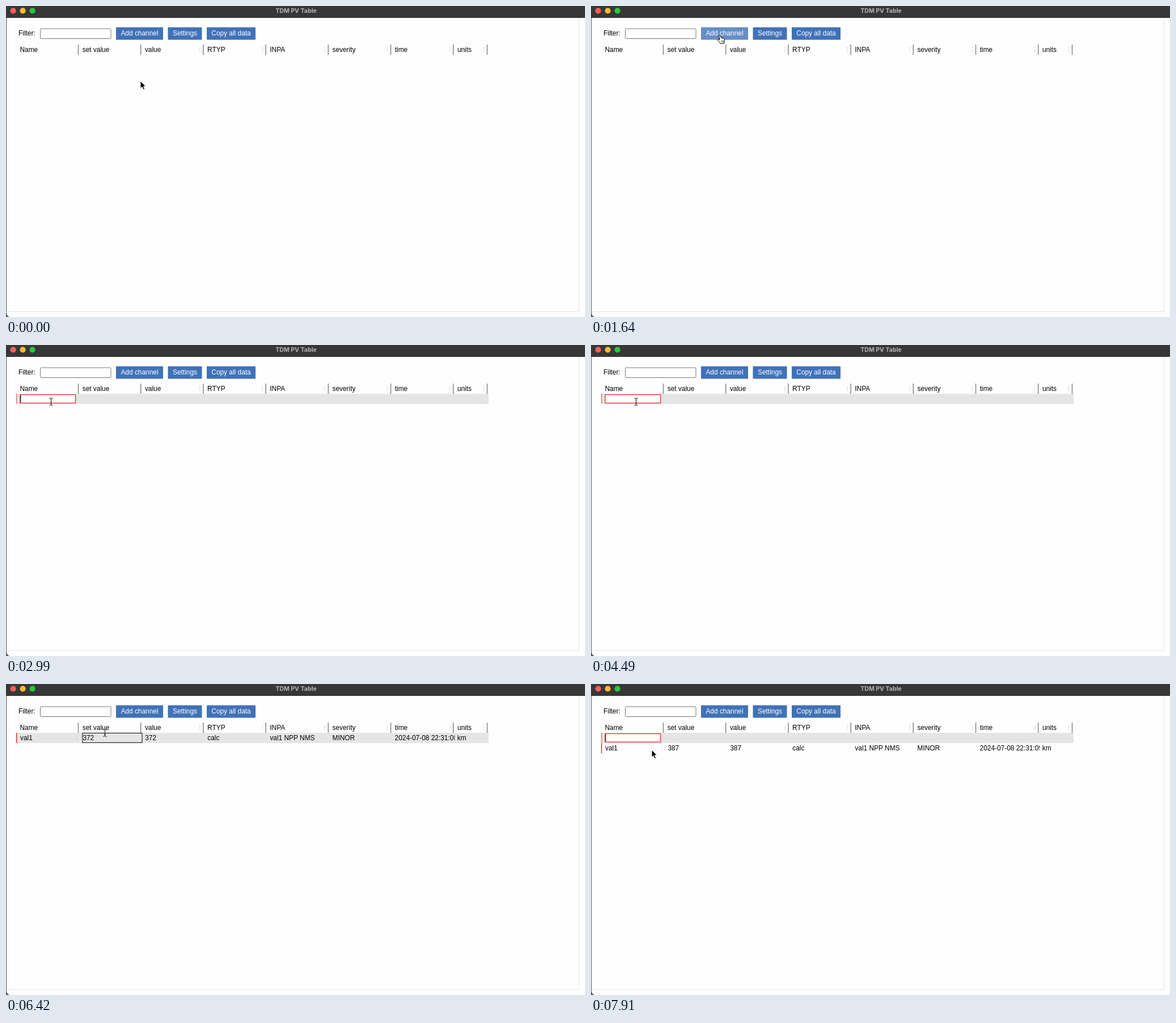
An HTML page for the animation above (8000 ms loop, 1021 by 548 pixels).

```html
<!DOCTYPE html>
<html>
<head>
<meta charset="utf-8">
<style>
html, body { margin: 0; width: 100%; height: 100%; overflow: hidden; background: #fefefe; }
svg { display: block; width: 1021px; height: 548px; }
text { font: 11.9px "Liberation Sans", Arial, sans-serif; white-space: pre; }
.title { font: 700 10.6px Inter, sans-serif; fill: #b5b4b5; text-anchor: middle; }
</style>
</head>
<body>
<svg id="stage" viewBox="0 0 1021 548">
  <defs>
    <clipPath id="timeClip"><rect x="680" y="80" width="111.5" height="50"/></clipPath>
  </defs>
  <rect width="1021" height="548" fill="#fefefe"/>
  <path d="M1010.5 21V538.5H1" fill="none" stroke="#e4e4e4"/>
  <path d="M0 20H1V541Q1.5 546 6 548H0Z" fill="#5a5a5a"/>
  <rect width="1021" height="21" fill="#383738"/>
  <text class="title" x="511.5" y="12">TDM PV Table</text>
  <g id="chrome"></g>
  <g id="rows"></g>
  <g id="pointer">
    <path id="arrow" d="M0 0V13.2L3 10.5L5.3 15.4L7.6 14.4L5.4 9.7H9.4Z" fill="#000" stroke="#fff" stroke-width="1" stroke-linejoin="round"/>
    <g id="hand">
      <path d="M-1.6 1.2Q-1 -.4 .6 .6L2.3 5Q3.4 3.9 4.4 5.1Q5.6 4.3 6.3 5.7Q7.8 5.3 8 7.2Q8.4 10.3 7.2 12.2V14.6H.4Q-.6 12-3.4 9.6Q-5.4 7.4-3.8 6.9Q-2.6 6.6-.6 8.6Z" fill="#fff" stroke="#000" stroke-width="1" stroke-linejoin="round"/>
      <path d="M2.4 9.3V12.2M4.2 9.1V12.2M6 8.9V12.2" stroke="#000" stroke-width=".7"/>
    </g>
    <g id="beam" fill="none">
      <path d="M-3-6.5Q0-6.5 0-4.5Q0-6.5 3-6.5M0-5V5M-3 6.5Q0 6.5 0 4.5Q0 6.5 3 6.5M-1.5 2.5H1.5" stroke="#fff" stroke-width="2.2" opacity=".6"/>
      <path d="M-3-6.5Q0-6.5 0-4.5Q0-6.5 3-6.5M0-5V5M-3 6.5Q0 6.5 0 4.5Q0 6.5 3 6.5M-1.5 2.5H1.5" stroke="#000"/>
    </g>
  </g>
</svg>
<script>
const LOOP = 8000;
const $ = id => document.getElementById(id);
const colX = i => 25 + 110.1 * i;

const rect = (x, y, w, h, more) => `<rect x="${x}" y="${y}" width="${w}" height="${h}" ${more}/>`;
const label = (x, y, s, more = '') => `<text x="${x}" y="${y}" ${more}>${s}</text>`;
const dots = (x, y, color) =>
  [-3.5, 0, 3.5].map(d => rect(x - .6, y + d - .6, 1.2, 1.2, `fill="${color}"`)).join('');

function chrome() {
  let s = '';
  ['#ff5f57', '#febc2e', '#28c840'].forEach((c, i) => {
    s += `<circle cx="${12.6 + 17 * i}" cy="8.4" r="5.1" fill="${c}"/>`;
  });
  s += label(22, 52.2, 'Filter:');
  s += rect(60.5, 40, 124.5, 17.5, 'rx="1.8" fill="#fff" stroke="#767676"');
  [['Add channel', 194, 83], ['Settings', 285.5, 60], ['Copy all data', 354, 86]].forEach(([name, x, w], i) => {
    s += rect(x, 37.5, w, 22, `rx="1" fill="#4072b8" ${i ? '' : 'id="add"'}`);
    s += label(x + w / 2, 52.2, name, 'fill="#fff" text-anchor="middle"');
  });
  ['Name', 'set value', 'value', 'RTYP', 'INPA', 'severity', 'time', 'units'].forEach((name, i) => {
    const edge = i < 7 ? 127.5 + 110.2 * i : 848.5;
    s += label(24.5 + 110.2 * i, 80.8, name);
    s += rect(edge - .8, 68, 1.6, 18, 'fill="#8a8a8a"');
    if (i > 1) s += dots(edge - 6, 77, '#aaa');
  });
  return s;
}

// [time, x, y, shape]
const moves = [
  [0, 237, 132, 'arrow'], [150, 233, 128, 'arrow'], [300, 214, 110, 'arrow'],
  [450, 192, 88, 'arrow'], [600, 182, 73, 'arrow'], [750, 190, 65, 'arrow'],
  [900, 216, 56, 'hand'], [1040, 227.5, 52.5, 'hand'], [1640, 227.5, 51.5, 'hand'],
  [2240, 168, 66, 'arrow'], [2390, 104, 87, 'beam'], [2540, 79.5, 98, 'beam'],
  [2990, 79.5, 100, 'beam'], [5380, 79, 99, 'arrow'], [5530, 79, 99, 'arrow'],
  [5680, 79, 99, 'arrow'], [5830, 79, 99, 'arrow'], [5980, 80, 99, 'arrow'],
  [6120, 88, 98.5, 'arrow'], [6270, 110, 96, 'arrow'], [6420, 174.5, 86, 'beam'],
  [6560, 194, 74, 'arrow'], [6710, 205, 66, 'arrow'], [6860, 211, 62, 'arrow'],
  [7010, 213, 60, 'arrow'], [7160, 214, 60, 'arrow'], [7310, 218, 54, 'hand'],
  [7460, 219, 52, 'hand'], [7610, 219, 52, 'hand'], [7760, 158, 88, 'arrow'],
  [7910, 107, 116, 'arrow']
];

const caretOn = t => t < 2540 || (t >= 2990 && t < 3440) || (t >= 3890 && t < 4490) || t >= 4780;
const typed = t => t < 4780 ? '' : t < 4930 ? 'v' : t < 5230 ? 'va' : 'val1';

const rowBack = y => rect(18, y, 833, 18, 'fill="#e5e5e5"');
const bar = (y, dash) =>
  `<path d="M18.6 ${y}V${y + 18}" stroke="#f03030" stroke-width="1.6" ${dash ? 'stroke-dasharray="1.7 1.3"' : ''}/>`;

function editRow(y, text, caret) {
  const w = { '': 0, v: 6, va: 12.6, val1: 21.8 }[text];
  return rowBack(y) + bar(y, true) + dots(124.8, y + 9, '#b8b8b8') +
    rect(25, y + 1.5, 97.5, 14.8, 'fill="#fff" stroke="#ee3b3b" stroke-width="1.4"') +
    label(25.5, y + 12.8, text) +
    (caret ? rect(25.2 + w, y + 2.2, 1.1, 13.3, 'fill="#000"') : '');
}

function dataRow(y, t, lit, live, hover) {
  const count = Math.ceil(372 + (t - 6420) / 100);
  const sec = 7 + Math.max(0, Math.floor((t - 5050) / 1000));
  const cells = live
    ? ['val1', count, count, 'calc', 'val1 NPP NMS', 'MINOR', `2024-07-08 22:31:0${sec}`, 'km']
    : ['val1', '', '', 'calc', 'val1 NPP NMS', 'INVALID', '', ''];
  let s = (lit ? rowBack(y) : '') + bar(y, !live) + dots(124.8, y + 9, '#b0b0b0');
  cells.forEach((c, i) => {
    s += label(i === 1 ? 135.4 : colX(i), y + 12.8, c, i === 6 ? 'clip-path="url(#timeClip)"' : '');
  });
  if (hover) s += rect(135, y + .5, 105, 16.8, 'fill="none" stroke="#000"');
  return s;
}

function rows(t, step) {
  if (t < 1940) return '';
  if (t < 5380) return editRow(86, typed(t), caretOn(t));
  const live = t >= 5530;
  if (t < 7610) return dataRow(86, step, true, live, t >= 6420 && t < 6560);
  return editRow(86, '', true) + dataRow(104, step, false, true, false);
}

let last = '';
function draw(t) {
  const [step, x, y, shape] = moves.filter(m => m[0] <= t).pop();
  $('pointer').setAttribute('transform', `translate(${x} ${y})`);
  for (const id of ['arrow', 'hand', 'beam']) {
    $(id).setAttribute('visibility', id === shape ? 'visible' : 'hidden');
  }
  $('add').setAttribute('fill', shape === 'hand' ? '#668ec6' : '#4072b8');
  const html = rows(t, step);
  if (html !== last) $('rows').innerHTML = last = html;
}

$('chrome').innerHTML = chrome();
const start = performance.now();
function tick() {
  draw((performance.now() - start) % LOOP);
  requestAnimationFrame(tick);
}
tick();
</script>
</body>
</html>
```
